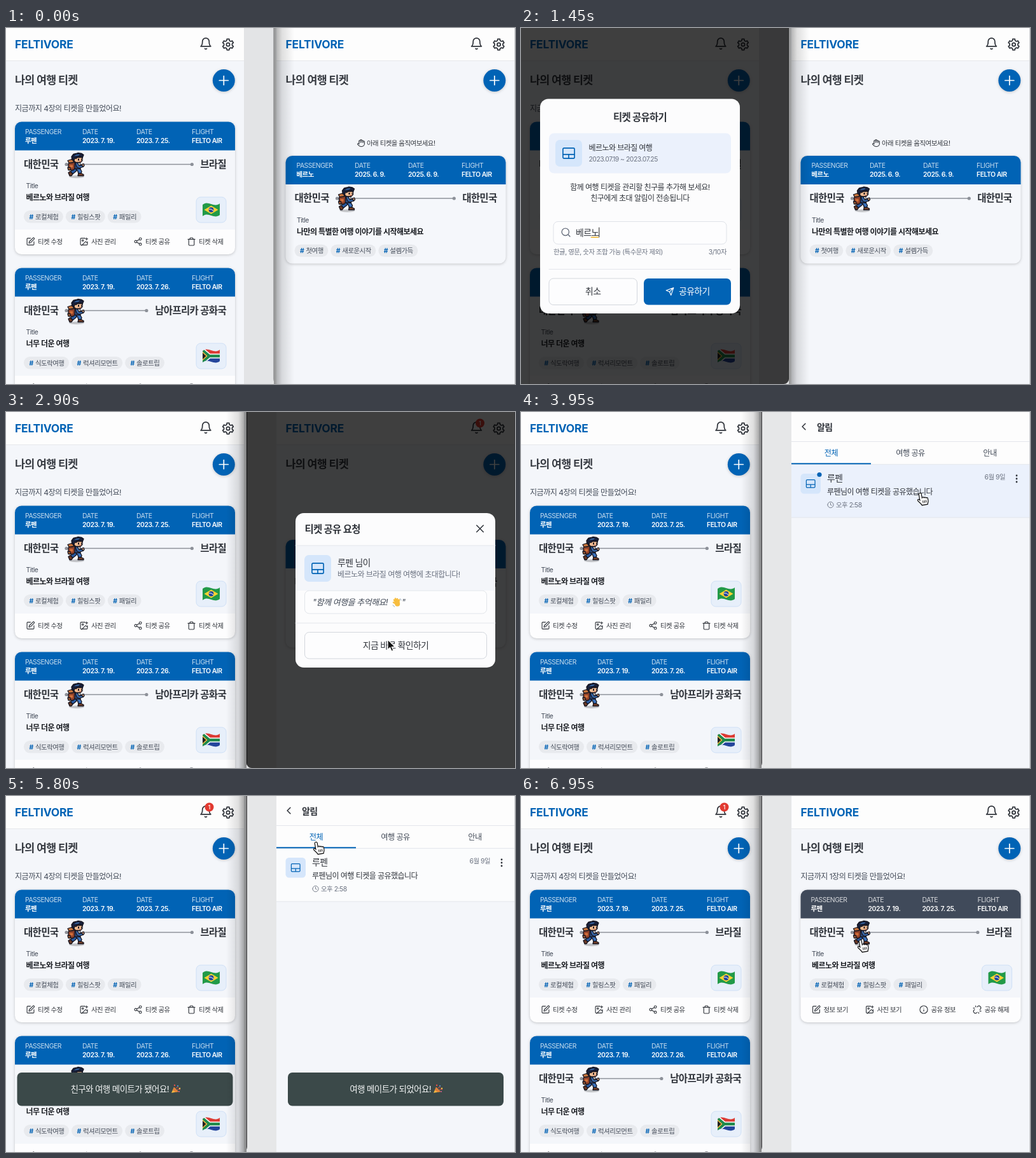
These frames come from a looping animation (800x560 px, 7 s). An HTML page:

```html
<!DOCTYPE html>
<html lang="ko">
<head>
<meta charset="utf-8">
<style>
html, body { margin: 0; width: 100%; height: 100%; overflow: hidden; background: #f4f6fa; }
svg { display: block; width: 800px; height: 560px; }
text { font-family: Inter, 'Noto Sans CJK KR', 'Noto Sans CJK', 'Noto Sans', sans-serif; letter-spacing: -.045em; white-space: pre; }
.card { filter: drop-shadow(0 1px 2px #0003); }
.icon { fill: none; stroke-linecap: round; stroke-linejoin: round; }
</style>
</head>
<body>
<svg id="stage" viewBox="0 0 800 560"></svg>
<script>
const BLUE = '#0163b5', INK = '#30343b', MID = '#434b58', SOFT = '#6b7280', PAGE = '#f4f6fa', WHITE = '#fdfdfe';
const HOST = '루펜', GUEST = '베르노', APP = 'FELTIVORE', AIR = 'FELTO AIR';
const TRIP = GUEST + '와 브라질 여행';

// drawing helpers
const text = (x, y, s, size, fill = INK, weight = 400, anchor = 'start', more = '') =>
  `<text x="${x}" y="${y}" font-size="${size}" fill="${fill}" font-weight="${weight}" text-anchor="${anchor}" ${more}>${s}</text>`;
const box = (x, y, w, h, fill, r = 0, stroke = 'none') =>
  `<rect x="${x}" y="${y}" width="${w}" height="${h}" rx="${r}" fill="${fill}" stroke="${stroke}"/>`;
const line = (x1, y1, x2, y2, color = '#e3e6eb', w = 1) =>
  `<path d="M${x1} ${y1}L${x2} ${y2}" stroke="${color}" stroke-width="${w}" stroke-linecap="round"/>`;
const dot = (x, y, r, fill) => `<circle cx="${x}" cy="${y}" r="${r}" fill="${fill}"/>`;
const shape = (d, fill, more = '') => `<path d="${d}" fill="${fill}" ${more}/>`;
const at = (x, y, s, more = '') => `<g transform="translate(${x} ${y}) ${more}">${s}</g>`;
const group = (id, s) => `<g id="${id}">${s}</g>`;
const icon = (x, y, size, d, color = INK, w = 2) =>
  `<path class="icon" transform="translate(${x} ${y}) scale(${size / 24}) translate(-12 -12)" d="${d}" stroke="${color}" stroke-width="${w}"/>`;
const ring = (x, y, r) => `M${x - r} ${y}a${r} ${r} 0 1 0 ${2 * r} 0a${r} ${r} 0 1 0 ${-2 * r} 0`;
const hangulWidth = (s, size) => [...s].reduce((n, c) => n + (c === ' ' ? .235 : .875), 0) * size;

function gear() {
  const pts = [];
  for (let k = 0; k < 6; k++)
    for (const [a, r] of [[-12, 10], [12, 10], [16, 8], [30, 7.2], [44, 8]]) {
      const q = (k * 60 + a - 90) * Math.PI / 180;
      pts.push((12 + r * Math.cos(q)).toFixed(2) + ' ' + (12 + r * Math.sin(q)).toFixed(2));
    }
  return 'M' + pts.join('L') + 'Z' + ring(12, 12, 3);
}

const FRAME = 'a2 2 0 0 0-2 2v14a2 2 0 0 0 2 2h14a2 2 0 0 0 2-2v-7';
const ICON = {
  bell: 'M6 8a6 6 0 0 1 12 0c0 7 3 9 3 9H3s3-2 3-9M10.3 21a2 2 0 0 0 3.4 0',
  gear: gear(),
  edit: `M12 3H5${FRAME}M18.4 2.6a2.1 2.1 0 0 1 3 3L12 15l-4 1 1-4Z`,
  photo: `M15 3H5${FRAME}M16 5h6M19 2v6M21 16l-3-3a2 2 0 0 0-3 0l-9 9` + ring(9, 9, 2),
  share: ring(18, 5, 3) + ring(6, 12, 3) + ring(18, 19, 3) + 'M8.6 13.5l6.8 4M15.4 6.5l-6.8 4',
  trash: 'M3 6h18M19 6v14a2 2 0 0 1-2 2H7a2 2 0 0 1-2-2V6M8 6V4a2 2 0 0 1 2-2h4a2 2 0 0 1 2 2v2',
  info: ring(12, 12, 10) + 'M12 16v-4M12 8v.01',
  unlink: 'M18.8 12.2l1.7-1.7a5 5 0 0 0-7-7l-1.7 1.7M5.2 11.8l-1.7 1.7a5 5 0 0 0 7 7l1.7-1.7M8 2v3M2 8h3M16 19v3M19 16h3',
  send: 'M22 2L15 22l-4-9-9-4ZM22 2L11 13',
  search: ring(11, 11, 8) + 'M21 21l-4.3-4.3',
  hand: 'M18 11V6a2 2 0 0 0-4 0M14 10V4a2 2 0 0 0-4 0v2M10 10.5V6a2 2 0 0 0-4 0v8M18 8a2 2 0 1 1 4 0v6a8 8 0 0 1-8 8h-2c-2.8 0-4.5-.9-6-2.3l-3.6-3.6a2 2 0 0 1 2.8-2.8L7 15',
  ticket: 'M4 3h16a2 2 0 0 1 2 2v14a2 2 0 0 1-2 2H4a2 2 0 0 1-2-2V5a2 2 0 0 1 2-2ZM2 14h20M12 14v7',
  clock: ring(12, 12, 10) + 'M12 6v6l4 2',
  close: 'M5 5L19 19M19 5L5 19',
  back: 'M15 6l-6 6 6 6',
  check: 'M3 13l6 6L21 6'
};

const EDGE = 'stroke="#15141f" stroke-width="1.3" stroke-linejoin="round"';
const WALKER =
  '<ellipse cx="1" cy="19.5" rx="12" ry="2.2" fill="#0003"/>' +
  shape('M-3 6L-7 10L-9 13L-5 15L0 11L2 8Z', '#2a5aa0', EDGE) +
  shape('M-9 11L-12 13L-10 18H-7L-5 15Z', '#6b3a26', EDGE) +
  shape('M-1 6H6L9 11L8 15H4L3 11Z', '#3a72bd', EDGE) +
  shape('M4 14H8L12 16V18H3Z', '#7a4229', EDGE) +
  shape('M-4 -3H6L7 7H-4Z', '#2d4f86', EDGE) + shape('M3 -2H6V6H4Z', '#f1ede6') +
  shape('M-10 -4L-5 -6L-2 -3V6L-4 9H-9L-12 6V-1Z', '#93432a', EDGE) +
  shape('M-13 -6L-7 -8L-4 -6V-3L-11 -2Z', '#c5733c', EDGE) +
  shape('M-10 1H-5V5H-9Z', '#d2703a') + shape('M-13 5H-9V9H-12Z', '#c5733c', EDGE) +
  shape('M-1 -2L2 -3L5 2L10 1L11 4L5 6L1 4Z', '#3766a6', EDGE) + shape('M9 0L12 -1L13 2L11 4Z', '#f0b48a', EDGE) +
  shape('M-4 -11H10V-6L7 -3H0L-4 -6Z', '#f3bd93', EDGE) +
  shape('M-6 -7L-7 -12L-4 -16L0 -17L3 -18L9 -17L12 -15L10 -10L8 -12L2 -11L0 -9L-2 -10L-3 -6Z', '#18203a', EDGE) +
  shape('M-3 -13L0 -15L6 -16L4 -14Z', '#3b6fb2') + shape('M3 -9H5V-6H3ZM8 -9H9V-6H8Z', '#15141f') +
  shape('M5 -5H8V-4H5Z', '#a84b3b');

const WAVE = 'M-13.5 -8C-8 -12 -4 -10 0 -9S9 -6 13.5 -10V8C9 12 4 10 0 9S-8 6 -13.5 10Z';
const FLAGS = {
  br: shape(WAVE, '#229a48') + shape('M-11 0L0 -6.5L11 0L0 6.5Z', '#fbd233') + dot(0, 0, 3.9, '#23459a') +
    '<path d="M-3.5 -1Q0 -2 3.5 1.5" fill="none" stroke="#fff"/>',
  za: '<g clip-path="url(#wave)">' + box(-14, -12, 28, 12, '#dc3b34') + box(-14, 0, 28, 12, '#24459c') +
    '<path d="M-16 -11L-3 0L-16 11M-3 0H15" fill="none" stroke="#fff" stroke-width="7.5"/>' +
    '<path d="M-16 -11L-3 0L-16 11M-3 0H15" fill="none" stroke="#1f8a4c" stroke-width="4.5"/>' +
    shape('M-14 -7.5L-6 0L-14 7.5Z', '#f6b93b') + shape('M-14 -5.5L-8 0L-14 5.5Z', '#222') + '</g>'
};
const WAVING = '<g stroke="#f7bd3f" stroke-width="2.5" stroke-linecap="round">' +
  '<path d="M-1 1L-4 -4M0 -1L-2 -6M2 -1L1 -5.5M3 1L4 -4M0 3L-5 0"/></g>' + dot(1.2, 2.2, 4, '#f7bd3f') +
  '<path d="M5 -6q2 1 2 3M-6 4q1 2 3 3" fill="none" stroke="#8fa3b8"/>';
const POPPER = shape('M-7 6L-3 -3L4 4Z', '#f5b942') + shape('M-5 2L-3 -3L4 4L0 5Z', '#e2803a') +
  dot(-2, -6, 1.2, '#e8504a') + dot(3, -5, 1.1, '#4aa3e0') + dot(6, -1, 1.2, '#f2c846') + dot(5, 4, 1, '#e05a9a') +
  '<path d="M0 -1q1 -3 4 -2M2 1q2 -2 5 0" fill="none" stroke="#e8504a"/>';

function card(x, w, y, o) {
  const end = x + w, rowY = y + 67, stop = end - 14 - hangulWidth(o.to, 15.5) - 13;
  const cols = o.cols || [16, 106, 191, 278];
  const heads = [['PASSENGER', o.who || HOST], ['DATE', o.from || '2023. 7. 19.'], ['DATE', o.until], ['FLIGHT', AIR]];
  let s = '<g class="card">' + box(x, y, w, o.acts ? 208.5 : 169.5, o.acts ? WHITE : '#f5f7fb', 10.5) + '</g>';
  if (o.acts) s += box(x, y + 45, w, 124.5, PAGE);
  s += shape(`M${x} ${y + 45}v-34.5a10.5 10.5 0 0 1 10.5-10.5h${w - 21}a10.5 10.5 0 0 1 10.5 10.5v34.5Z`, o.color || BLUE);
  heads.forEach(([k, v], i) => {
    s += text(x + cols[i], y + 19, k, 10.4, '#ffffffc8') + text(x + cols[i], y + 33, v, 10.4, '#fff', 600);
  });
  s += text(x + 14, y + 72, '대한민국', 15.5, INK, 600) + text(end - 14, y + 72, o.to, 15.5, INK, 600, 'end');
  s += line(x + 81, rowY, stop, rowY, '#8d9199', 1.7) + dot(x + 81, rowY, 2.6, '#8d9199') + dot(stop, rowY, 2.6, '#8d9199');
  s += `<g ${o.id ? `id="${o.id}"` : ''} transform="translate(${x + 96} ${rowY})">${WALKER}</g>`;
  s += text(x + 17.5, y + 104.5, 'Title', 10.4, MID) + text(x + 17.5, y + 123.5, o.title, 12, '#181b20', 600);
  let tx = x + 14;
  for (const tag of o.tags) {
    const tw = 25.5 + 9.1 * tag.length;
    s += box(tx, y + 139.5, tw, 19.5, '#e8eaee', 9.7) + text(tx + 8.5, y + 153, '#', 10.4, BLUE, 700) +
      text(tx + 18, y + 153, tag, 10.4, MID);
    tx += tw + 4;
  }
  if (o.flag) s += box(end - 61, y + 118.5, 47, 40, '#e7effa', 7, '#cfe0f6') + at(end - 37.5, y + 138.5, FLAGS[o.flag]);
  (o.acts || []).forEach(([name, label], i) => {
    const ax = x + [24.5, 108.5, 193.5, 277.5][i];
    s += icon(ax, y + 188.5, 14.5, ICON[name], INK, 1.9) + text(ax + 11.5, y + 192, label, 10.4, INK, 500);
  });
  return s;
}

const brazil = { until: '2023. 7. 25.', to: '브라질', title: TRIP, tags: ['로컬체험', '힐링스팟', '패밀리'], flag: 'br' };
const ownActs = [['edit', '티켓 수정'], ['photo', '사진 관리'], ['share', '티켓 공유'], ['trash', '티켓 삭제']];
const mateActs = [['edit', '정보 보기'], ['photo', '사진 보기'], ['info', '공유 정보'], ['unlink', '공유 해제']];

const home = (x, badge) => box(x, 0, 376, 51, '#fdfdfd') + line(x, 51.5, x + 376, 51.5, '#e6e8ec') +
  text(x + 14, 32, APP, 17.4, BLUE, 700, 'start', 'style="letter-spacing:-.01em"') +
  icon(x + 314, 24.5, 21, ICON.bell) + icon(x + 349, 26, 21, ICON.gear) +
  group(badge, dot(x + 319.5, 17.5, 7, '#e23a31') + text(x + 319.3, 21, '1', 9.5, '#fff', 500, 'middle')) +
  text(x + 14, 88, '나의 여행 티켓', 17.4, '#383c43', 600) +
  '<g class="card">' + dot(x + 342.3, 82.5, 17.5, BLUE) + '</g>' +
  line(x + 335.3, 82.5, x + 349.3, 82.5, '#fff', 1.7) + line(x + 342.3, 75.5, x + 342.3, 89.5, '#fff', 1.7);
const count = (x, n) => text(x + 14, 131, `지금까지 ${n}장의 티켓을 만들었어요!`, 12.1, MID);
const panel = (x, y, h) => box(x, y, 314, h, '#fcfcfd', 13);
const badgeIcon = (x, y, size) => box(x, y, size, size, '#d5e6fb', size / 6) + icon(x + size / 2, y + size / 2, size * .52, ICON.ticket, BLUE, 1.8);
const button = (x, y, w, label, fill = '#fdfdfe', color = INK, id = '') =>
  `<rect ${id && `id="${id}"`} x="${x}" y="${y}" width="${w}" height="41.5" rx="7" fill="${fill}" stroke="${color === INK ? '#d3d7dd' : 'none'}"/>` +
  text(x + w / 2, y + 25, label, 13.9, color, 500, 'middle');
const toast = (x, label, ex) => box(x, 435, 339, 52.5, '#3b4949', 7) +
  text(ex - 11, 465.5, label, 13.5, '#f3f5f5', 400, 'end') + at(ex, 461, POPPER);

const shareModal = box(0, 0, 421, 560, '#000000bf') + panel(30, 111.5, 337.5) +
  text(187, 145.5, '티켓 공유하기', 15.4, INK, 600, 'middle') +
  box(44, 165.5, 286, 63, '#ebf1fc', 8) + badgeIcon(54, 176, 42) +
  text(106.5, 193, TRIP, 12, INK, 500) + text(106.5, 209.5, '2023.07.19 ~ 2023.07.25', 10.4, SOFT) +
  text(187, 254.5, '함께 여행 티켓을 관리할 친구를 추가해 보세요!', 12, INK, 400, 'middle') +
  text(187, 272, '친구에게 초대 알림이 전송됩니다', 12, INK, 400, 'middle') +
  box(51, 304.5, 272, 35.5, '#fdfdfe', 7, '#dfe2e8') + icon(70.5, 321.5, 17, ICON.search, SOFT) +
  group('typed', text(86, 326.5, '', 13.9)) + group('mark', line(0, 329.3, 11, 329.3, '#f0b429', 1.5)) +
  group('caret', line(0, 314, 0, 329, '#222', 1)) +
  text(51, 356, '한글, 영문, 숫자 조합 가능 (특수문자 제외)', 10.4, SOFT) +
  group('tally', text(323, 356, '', 10.4, SOFT, 400, 'end')) + line(44, 379.5, 330, 379.5) +
  button(44, 394, 138.5, '취소') + box(193, 394, 137, 41.5, BLUE, 7) +
  icon(234, 414.5, 14, ICON.send, '#fff') + text(248, 419, '공유하기', 13.9, '#fff', 500);

const invite = (y, h, sub, message, ex) => box(378, 0, 422, 560, '#000000bf') + panel(455, y, h) +
  text(469.5, y + 30.5, '티켓 공유 요청', 15.4, INK, 600) + icon(745, y + 24.5, 18, ICON.close, INK, 2.1) +
  box(455, y + 51, 314, 71, PAGE) + line(455, y + 51, 769, y + 51) + badgeIcon(469, y + 66, 42) +
  text(521, y + 82.5, HOST + ' 님이', 13.9, INK, 500) + text(521, y + 101, sub, 12, SOFT) +
  box(469.5, y + 122, 286, 36, WHITE, 7, '#e2e5ea') +
  text(482, y + 145, `"${message}`, 13.1, MID, 400, 'start', 'font-style="italic"') + at(ex, y + 140.5, WAVING) +
  text(ex + 8, y + 145, '"', 13.1, MID, 400, 'start', 'font-style="italic"');

const quickModal = invite(159, 243, TRIP + ' 여행에 초대합니다!', '함께 여행을 추억해요!', 614) +
  line(455, 332, 769, 332) + button(469.5, 346.5, 286, '지금 바로 확인하기');
const perks = ['같은 장소의 사진이 자동으로 공유됩니다', '함께한 여행 기록을 간직할 수 있습니다', '실시간으로 여행 위치를 공유할 수 있습니다'];
const fullModal = invite(9, 543, '브라질 여행에 초대합니다', '함께 브라질 여행 가요!', 618) +
  card(469, 287, 181, { ...brazil, cols: [8.5, 84, 154, 226], id: 'walker' }) +
  box(469, 364.5, 287, 102.5, '#e9f0fc', 7) + text(479.5, 387, '함께 여행하면 좋은 점', 13.8, '#174c82', 500) +
  perks.map((p, i) => icon(486.5, 407 + i * 19.3, 12, ICON.check, BLUE, 2.6) + text(500, 410 + i * 19.3, p, 12, MID)).join('') +
  line(455, 482, 769, 482) + button(469.5, 497, 138, '거절하기') + button(618, 497, 137.5, '함께 여행하기', BLUE, '#fff', 'accept');

const inbox = box(425, 0, 375, 560, PAGE) + box(425, 0, 375, 82, '#fdfdfd') + line(425, 46.5, 800, 46.5) +
  icon(444.5, 23, 19, ICON.back) + text(465, 28.5, '알림', 14, INK, 600) +
  text(487.5, 69, '전체', 12.2, BLUE, 500, 'middle') + text(612, 69, '여행 공유', 12.2, MID, 400, 'middle') +
  text(737, 69, '안내', 12.2, MID, 400, 'middle') + line(425, 82.3, 800, 82.3) + box(425, 80.3, 125, 2, BLUE) +
  '<rect id="row" x="425" y="83" width="375" height="83"/>' + line(425, 166, 800, 166) +
  badgeIcon(439.5, 97, 31.5) + group('unread', dot(469, 98.5, 3.6, BLUE)) +
  text(481, 108.5, HOST, 13.9, INK, 500) + text(481, 130, HOST + '님이 여행 티켓을 공유했습니다', 12, INK) +
  icon(486.5, 146, 11, ICON.clock, SOFT) + text(495, 150, '오후 2:58', 10.4, SOFT) +
  text(761, 106, '6월 9일', 10.4, SOFT, 400, 'end') + [100, 105, 110].map(y => dot(779, y, 1.4, INK)).join('');

const R = 425.5;
const starter = icon(558, 181, 13, ICON.hand) + text(567, 184.5, '아래 티켓을 움직여보세요!', 10.4, INK) +
  card(R + 14, 346, 201, { cols: [17, 108.5, 192.5, 276.5], who: GUEST, from: '2025. 6. 9.', until: '2025. 6. 9.',
    to: '대한민국', title: '나만의 특별한 여행 이야기를 시작해보세요', tags: ['첫여행', '새로운시작', '설렘가득'] });
const joined = count(R, 1) + card(R + 14, 346, 147.5, { ...brazil, color: '#404a5a', acts: mateActs });

const leftWin = group('shadeL', box(421, 0, 32, 560, 'url(#fadeR)')) + '<g clip-path="url(#winL)">' +
  box(0, 0, 374, 560, PAGE) + home(0, 'badgeL') + count(0, 4) +
  card(14, 346, 147.5, { ...brazil, acts: ownActs }) +
  card(14, 346, 377.5, { until: '2023. 7. 26.', to: '남아프리카 공화국', title: '너무 더운 여행', flag: 'za',
    tags: ['식도락여행', '럭셔리모먼트', '솔로트립'], acts: ownActs }) +
  box(374, 0, 47, 560, '#e3e4e6') + box(420, 0, 1, 560, '#a5a6a8') +
  group('toastL', toast(17.5, '친구와 여행 메이트가 됐어요!', 267)) + group('shareM', shareModal) + '</g>';

const rightWin = group('shadeR', box(346, 0, 32, 560, 'url(#fadeL)')) + '<g clip-path="url(#winR)">' +
  box(378, 0, 422, 560, PAGE) + group('homeR', home(R, 'badgeR') + group('starter', starter) + group('joined', joined)) +
  group('inbox', inbox) + box(378, 0, 47, 560, '#e6e7e8') + box(378, 0, 1, 560, '#3c3c3e') + box(799, 0, 1, 560, '#cfd1d4') +
  group('toastR', toast(443, '여행 메이트가 되었어요!', 679)) + group('quickM', quickModal) + group('fullM', fullModal) + '</g>';

const pointer = group('arrow', shape('M0 0V16L3.6 12.6L6 18.2L8.8 17L6.4 11.6H11.5Z', '#111', 'stroke="#fff" stroke-width="1.2"')) +
  group('finger', '<g transform="rotate(-10)">' + shape('M-2 1.5a2 2 0 0 1 4 0V7.5a1.8 1.8 0 0 1 3.2 .4a1.8 1.8 0 0 1 3 .8a1.6 1.6 0 0 1 2.6 1.2V13c0 3-1.5 4-1.8 6H0c-.6-2.4-3-4.5-5.2-8c-.9-1.6 1.2-3 2.4-1.4L-2 10.6Z',
    '#fff', 'stroke="#111" stroke-width="1.2"') + '<path d="M2.5 12v4M5 12v4M7.5 12v4" stroke="#111"/></g>');

const fade = (id, from, to, mid) => `<linearGradient id="${id}"><stop offset="0" stop-opacity="${from}"/>` +
  `<stop offset="${mid}" stop-opacity=".12"/><stop offset="1" stop-opacity="${to}"/></linearGradient>`;
const stage = document.getElementById('stage');
stage.innerHTML = '<defs>' + fade('fadeR', .36, 0, .4) + fade('fadeL', 0, .42, .6) +
  `<clipPath id="wave"><path d="${WAVE}"/></clipPath>` +
  `<clipPath id="winL">${box(-20, -20, 441, 580, '#000', 8)}</clipPath>` +
  `<clipPath id="winR">${box(378, -20, 442, 580, '#000', 8)}</clipPath></defs>` +
  group('wins', group('rightWin', rightWin) + group('leftWin', leftWin)) + group('pointer', pointer);

// motion
const $ = id => document.getElementById(id);
const clamp = v => Math.max(0, Math.min(1, v));
const ease = v => v * v * (3 - 2 * v);
const show = (id, v) => { $(id).style.display = v ? '' : 'none'; $(id).style.opacity = +v; };
const span = (t, on, off) => Math.min(clamp((t - on) / 150), clamp((off - t) / 100));
const move = (id, x, y) => $(id).setAttribute('transform', `translate(${x} ${y})`);

// time, x, y, look (0 hidden, 1 arrow, 2 finger)
const PATH = [
  [0, 300, 430, 0], [50, 300, 430, 1], [300, 232, 337, 2], [450, 232, 337, 1], [750, 150, 320, 0],
  [1550, 200, 385, 1], [1700, 262, 413, 2], [1850, 262, 413, 1], [2250, 262, 413, 1], [2850, 600, 358, 1],
  [2950, 600, 358, 2], [3300, 600, 358, 1], [3850, 627, 128, 2], [4250, 627, 128, 1], [4400, 627, 128, 1],
  [4950, 666, 505, 2], [5450, 666, 505, 2], [5800, 487, 73, 2], [5850, 487, 73, 2], [6100, 444, 20, 2],
  [6300, 444, 20, 1], [6850, 533, 227, 2], [7000, 533, 227, 2]
];
const TYPING = ['', 'ㅂ', '베', '벨', '베르', '베른', GUEST];

function drawPointer(t) {
  let i = 0;
  while (i < PATH.length - 2 && PATH[i + 1][0] <= t) i++;
  const [t0, x0, y0, look] = PATH[i], [t1, x1, y1] = PATH[i + 1];
  const k = ease(clamp((t - t0) / (t1 - t0)));
  move('pointer', x0 + (x1 - x0) * k, y0 + (y1 - y0) * k);
  show('arrow', look === 1);
  show('finger', look === 2);
}

let front = 'leftWin';
function render(t) {
  const top = t < 2550 ? 'leftWin' : 'rightWin';
  if (top !== front) $('wins').append($(front = top));
  show('shadeL', top === 'leftWin');
  show('shadeR', top === 'rightWin');

  show('shareM', span(t, 350, 1900));
  const word = TYPING[Math.max(0, Math.min(6, Math.floor((t - 750) / 100)))], n = word.length;
  $('typed').firstChild.textContent = word;
  $('tally').firstChild.textContent = n + '/10자';
  move('mark', 86 + 12.16 * (n - 1), 0);
  show('mark', n > 0);
  move('caret', 86.3 + 12.16 * n, 0);
  show('caret', t >= 750);

  const reading = t >= 3250 && t < 6250;
  show('homeR', !reading);
  show('inbox', reading);
  show('starter', t < 6250);
  show('joined', t >= 6250);
  show('badgeR', t >= 1950 && t < 3250);
  show('badgeL', t >= 5600);
  show('quickM', span(t, 1950, 3300));
  show('fullM', span(t, 4200, 5550));
  move('walker', 565 + 115 * clamp((t - 4400) / 600), 248);
  $('accept').setAttribute('fill', t >= 4900 ? '#0a4f8c' : BLUE);
  $('row').setAttribute('fill', t < 4200 ? '#ebf1fc' : '#fbfcfd');
  show('unread', t < 4200);
  show('toastL', span(t, 5550, 6500));
  show('toastR', span(t, 5550, 6500));
  drawPointer(t);
}

const start = performance.now();
function tick() {
  render(Math.floor((performance.now() - start) % 7000 / 50) * 50);
  requestAnimationFrame(tick);
}
tick();
</script>
</body>
</html>
```
